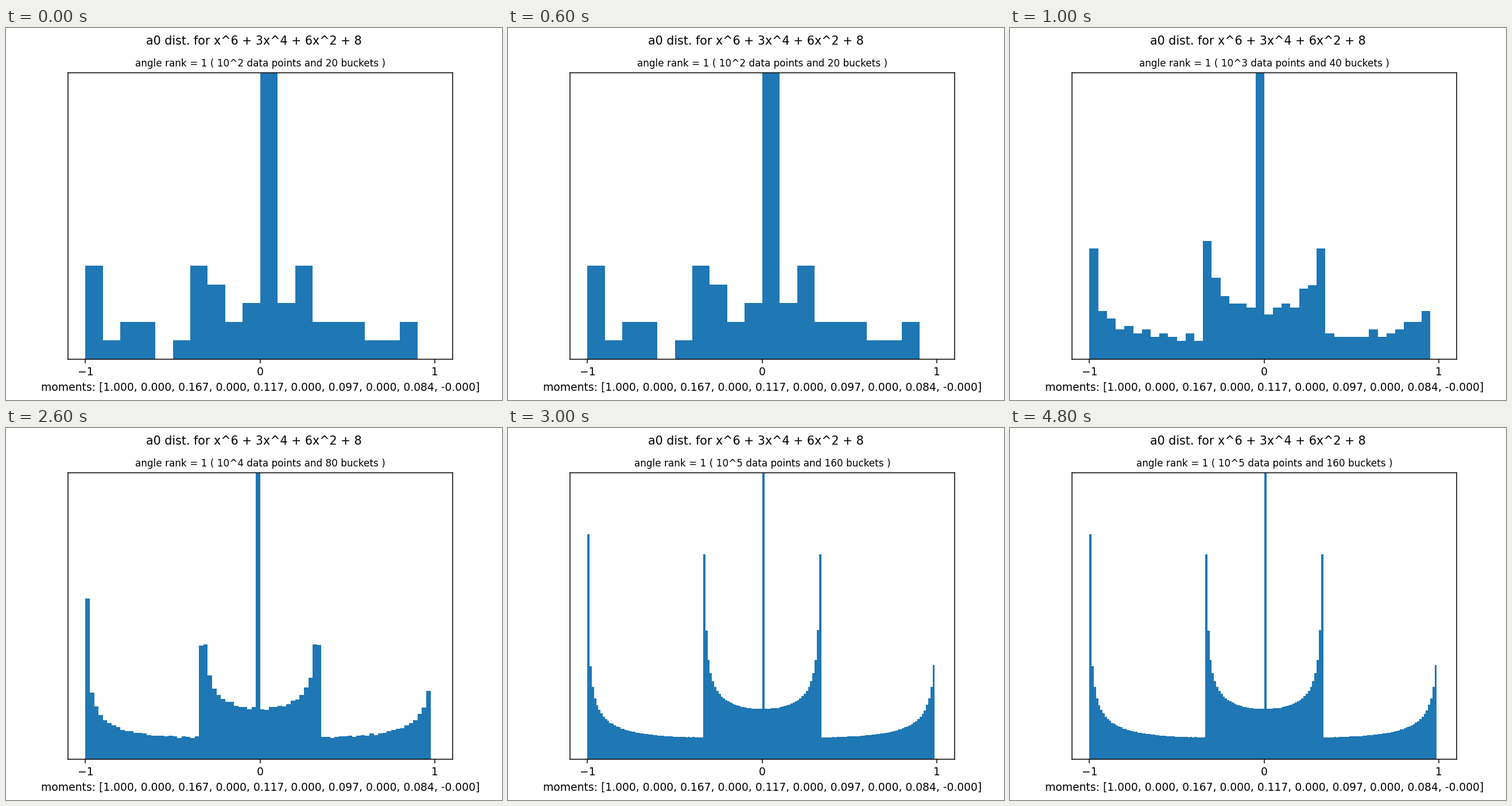
Animation of 864x648 px, one loop 6 s. Source, as a matplotlib script:

```python
import numpy as np
import matplotlib.pyplot as plt
from matplotlib.animation import FuncAnimation

plt.rcParams["font.family"] = "DejaVu Sans"

LEVELS = 4
SECONDS = 6
MOMENTS = [1, 0, 1 / 6, 0, 7 / 60, 0, 0.097, 0, 0.084, -0.0]


def traces(n):
    """Normalised power sums of the roots of x^6 + 3x^4 + 6x^2 + 8.

    Odd powers vanish; with y = x^2 the cubic is (y + 2)(y^2 + y + 4).
    """
    k = np.arange(1, n // 2 + 1)
    even = ((-1.0) ** k + 2 * np.cos(k * np.arccos(-0.25))) / 3
    return np.concatenate([np.zeros(n - len(k)), even])


def histogram(level):
    buckets = 20 * 2**level
    # arange leaves out the edge at 1, so the last bucket is not drawn
    edges = np.arange(-1, 1, 2 / buckets)
    return edges, traces(10 ** (level + 2)), buckets


fig, ax = plt.subplots(figsize=(6.4, 4.8), dpi=135)
fig.suptitle("a0 dist. for x^6 + 3x^4 + 6x^2 + 8", fontsize=11)
ax.set_xlabel("moments: [" + ", ".join(f"{m:.3f}" for m in MOMENTS) + "]")
title = ax.set_title("", fontsize=9)
ax.set_xticks([-1, 0, 1])
ax.set_yticks([])

bars, titles = [], []
for level in range(LEVELS):
    edges, data, buckets = histogram(level)
    bars.append(ax.hist(data, bins=edges, density=True, color="C0")[2])
    titles.append(f"angle rank = 1 ( 10^{level + 2} data points "
                  f"and {buckets} buckets )")
ax.set_xlim(-1.1, 1.1)
ax.set_ylim(0, 1.6)


def draw(second):
    shown = min(second, LEVELS - 1)
    for level, group in enumerate(bars):
        for bar in group:
            bar.set_visible(level == shown)
    title.set_text(titles[shown])
    return [title]


anim = FuncAnimation(fig, draw, frames=SECONDS, init_func=lambda: draw(0),
                     interval=1000, repeat=True, repeat_delay=0)
plt.show()
```
